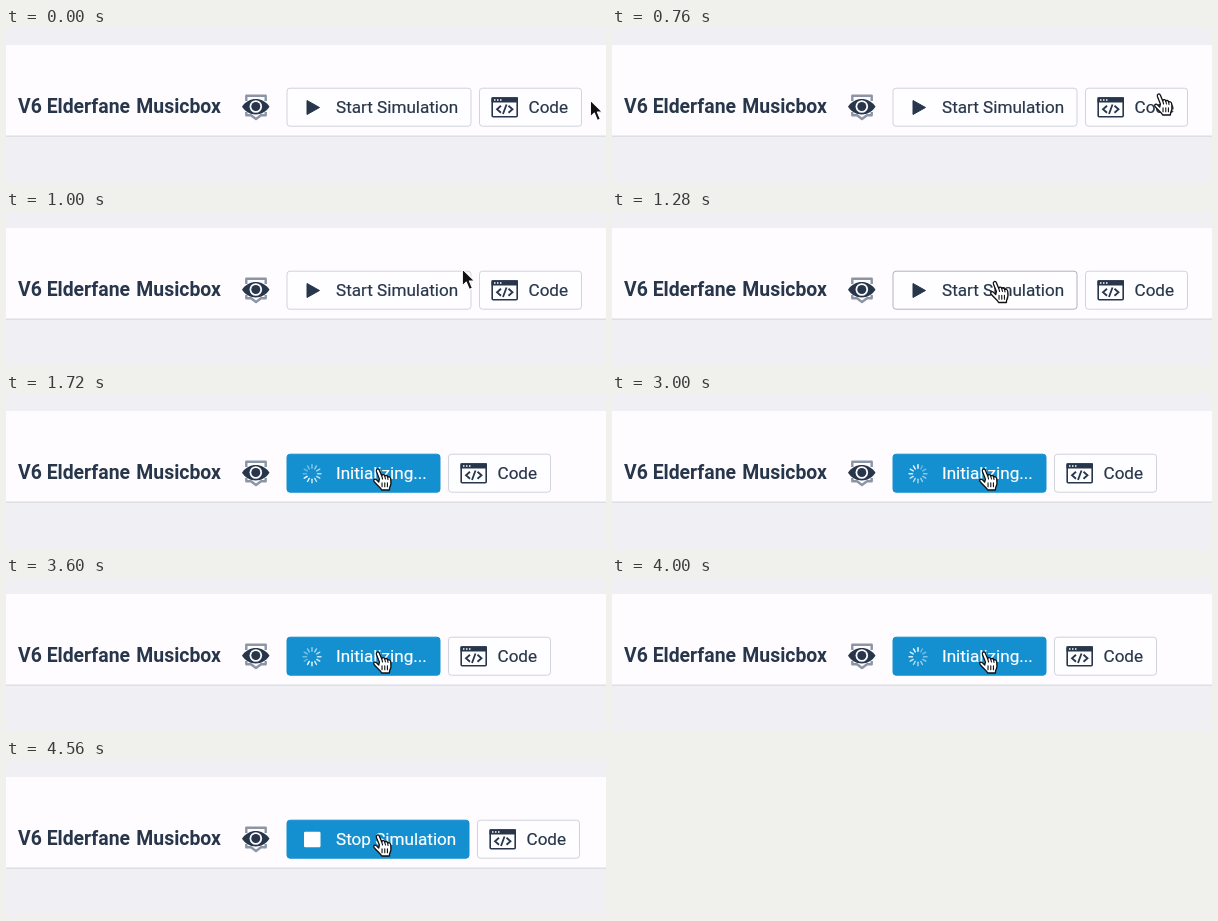
Animation of 600x155 px, one loop 4.6 s. Source, as an HTML page:

```html
<!DOCTYPE html>
<html lang="en">
<head>
<meta charset="utf-8">
<title>Simulation toolbar</title>
<style>
  html, body { margin: 0; width: 100%; height: 100%; overflow: hidden; background: #f0f0f4; }
  svg { display: block; width: 600px; height: 155px; }
  text { font: 17.1px Roboto, sans-serif; fill: #27364a; stroke: #27364a; stroke-width: .2px; }
  .title { font-size: 19.4px; font-weight: 600; stroke: none; }
  .dark { fill: #27364a; }
  .line { fill: none; stroke: #27364a; }
  .active { fill: #fff; stroke: #fff; }
</style>
</head>
<body>
<svg viewBox="0 0 600 155">
  <rect y="17" width="600" height="91" fill="#fefcff"/>
  <rect y="107.500" width="600" height="1.500" fill="#dedfe3"/>

  <text class="title" x="12" y="85.300">V6 Elderfane</text>
  <text class="title" x="215" y="85.300" text-anchor="end">Musicbox</text>

  <g id="eye">
    <path d="M240.300 73V67.800H259.700V73M240.300 84V87.300H245L250 91L255 87.300H259.700V84" fill="none"
      stroke="#8b95a3" stroke-width="2.400" stroke-linejoin="round"/>
    <path class="dark" d="M236 78.700C243 68.500 256.500 68.500 263.500 78.700C256.500 89 243 89 236 78.700Z"/>
    <circle cx="249.800" cy="78.500" r="6.300" fill="#fefcff"/>
    <circle class="dark" cx="249.800" cy="78.500" r="4.500"/>
  </g>

  <rect id="button" x="281" y="60.200" height="38" rx="3"/>
  <path id="play" class="dark" d="M301 72.500V86.500L313.500 79.500Z" stroke="#27364a" stroke-linejoin="round"/>
  <g id="spinner" transform="translate(306 79.700)" stroke="#fff" stroke-width="1.400" stroke-linecap="round"></g>
  <rect id="stop" x="298" y="71.700" width="16.500" height="15.500" rx="1.200" fill="#fff"/>
  <text id="label" x="330" y="85"></text>

  <g id="code">
    <rect x="473.500" y="60.200" width="102" height="38" rx="3" fill="#fefdff" stroke="#d0d3da"/>
    <rect class="line" x="486.200" y="70" width="25" height="18.700" rx="1" stroke-width="1.600"/>
    <path class="dark" d="M485.500 69.300H512V74.500H485.500Z"/>
    <path d="M488 72h1.500m1.500 0h1.500m1.500 0h1.500" stroke="#fefdff" stroke-width="1.300"/>
    <path class="line" d="M495 77.800L491 81.300L495 84.800M502.500 77.800L506.500 81.300L502.500 84.800M500.500 76.500L497 86"
      stroke-width="1.800"/>
    <text x="522.500" y="85">Code</text>
  </g>

  <path id="arrow" d="M0 0V17L4 13.300L7 20.600L10.200 19.200L7.200 12.200H12.500Z"
    fill="#111" stroke="#fff" stroke-width="1.300" stroke-linejoin="round"/>
  <g id="hand">
    <g transform="translate(-.7 -1) scale(1.1)" stroke="#111" stroke-width="1.200"
      stroke-linejoin="round" stroke-linecap="round">
      <path fill="#fff" d="M1.900 10L-.8 3.200C-1.500 .8 1.100 0 1.900 2L4 7C4.500 5.600 6.500 5.800 6.800 7.300
        C7.500 6.300 9.200 6.700 9.400 8.200C10.500 7.500 12 8.300 12.200 9.800C12.800 13 12.800 15 11.200 18
        L11 20H4C3 18 -1 15 -3 12.200C-4 10.600 -2 9.400 -.7 10.800L1.300 12.800Z"/>
      <path fill="none" d="M4 7L4.800 10M6.800 7.300L7.400 10M9.400 8.200L9.700 10.500M4.300 13.500V17M6.800 13.500V17M9.200 13.500V17"
        stroke-width="1"/>
    </g>
  </g>
</svg>
<script>
const LOOP = 4600, STEP = 40, BARS = 12;
const INIT = 1600, RUNNING = 4240;
const $ = id => document.getElementById(id);
const set = (id, attrs) => {
  for (const key in attrs) $(id).setAttribute(key, attrs[key]);
};
const show = (id, on) => set(id, { visibility: on ? 'visible' : 'hidden' });

// Pointer path: time, x, y of the hotspot
const path = [
  [640, 584.3, 72], [760, 547, 66], [960, 470, 56.5],
  [1120, 415, 62], [1280, 383, 70.5], [1440, 372, 75]
];
const states = [
  { text: 'Start Simulation', width: 184 },
  { text: 'Initializing...', width: 153 },
  { text: 'Stop Simulation', width: 182 }
];

for (let i = 0; i < BARS; i++) {
  const bar = document.createElementNS('http://www.w3.org/2000/svg', 'path');
  bar.setAttribute('d', 'M0 -5.500V-9');
  bar.setAttribute('transform', `rotate(${i * 360 / BARS})`);
  $('spinner').append(bar);
}

function pointerAt(t) {
  if (t <= path[0][0]) return path[0].slice(1);
  const next = path.findIndex(p => p[0] > t);
  if (next < 0) return path[path.length - 1].slice(1);
  const [t0, x0, y0] = path[next - 1], [t1, x1, y1] = path[next];
  const k = (t - t0) / (t1 - t0);
  return [x0 + (x1 - x0) * k, y0 + (y1 - y0) * k];
}

function draw(now) {
  const t = Math.floor(now % LOOP / STEP) * STEP;
  const mode = t < INIT ? 0 : t < RUNNING ? 1 : 2;
  const { text, width } = states[mode];
  const hover = Math.min(1, Math.max(0, (t - 1200) / 80));
  const grey = Math.round(208 - 32 * hover);

  set('button', {
    width,
    fill: mode ? '#1490d0' : '#fefdff',
    stroke: mode ? '#1490d0' : `rgb(${grey},${grey + 3},${grey + 10})`
  });
  $('label').textContent = text;
  set('label', { class: mode ? 'active' : '' });
  set('code', { transform: `translate(${width - states[0].width})` });
  show('play', mode === 0);
  show('spinner', mode === 1);
  show('stop', mode === 2);

  [...$('spinner').children].forEach((bar, i) => {
    const age = (t / 1000 - i / BARS + 10) % 1;
    bar.setAttribute('opacity', 1 - 0.7 * age);
  });

  const [x, y] = pointerAt(t);
  const over = y > 60 && (x < 465 || x > 473 && x < 576);
  show('hand', over);
  show('arrow', !over);
  for (const id of ['hand', 'arrow']) set(id, { transform: `translate(${x} ${y})` });
}

const start = performance.now();
function tick() {
  draw(performance.now() - start);
  requestAnimationFrame(tick);
}
tick();
</script>
</body>
</html>
```
